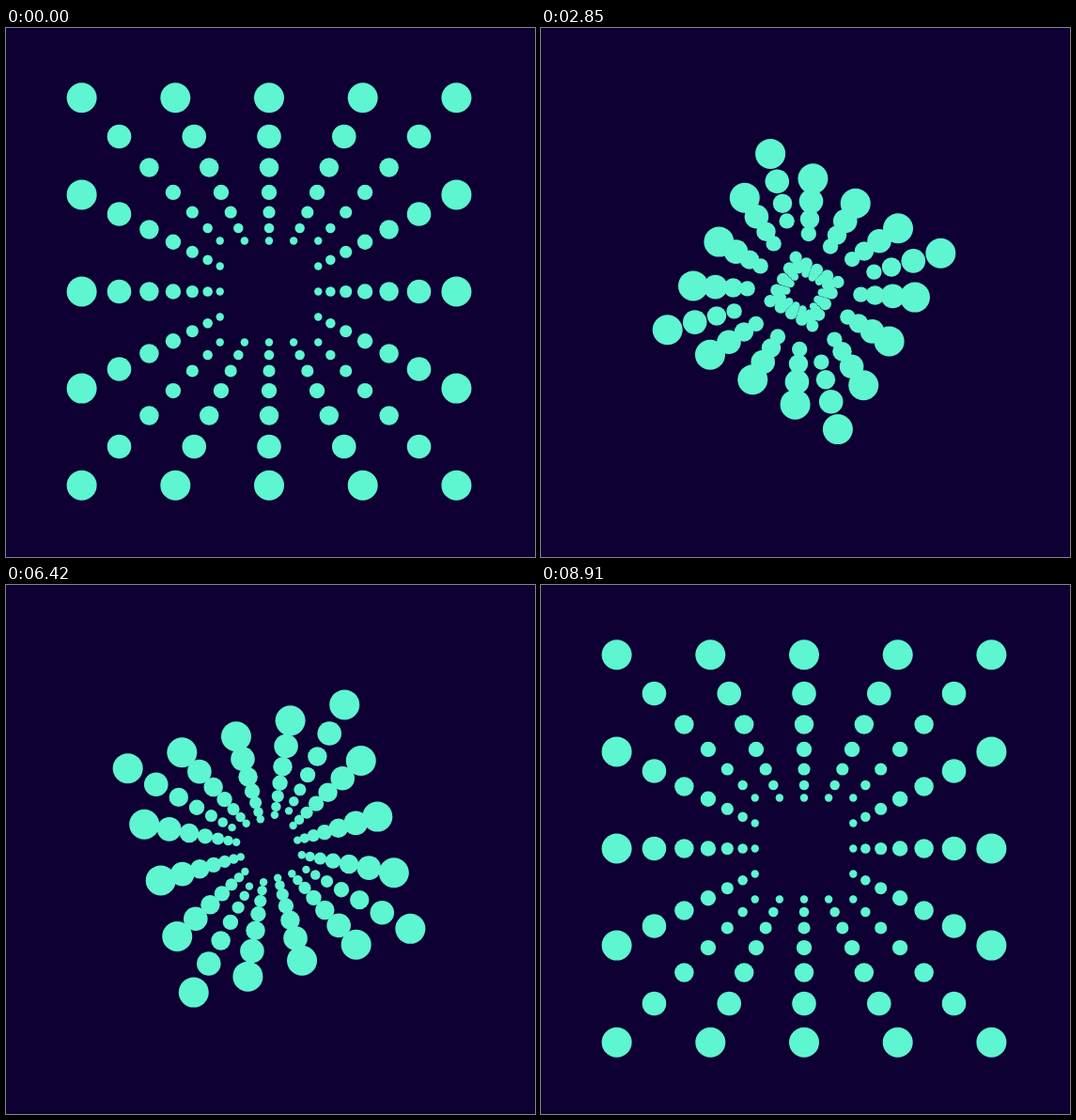
An HTML page with a canvas that plays this animation: 563x563 px, repeating every 8940 ms.

```html
<!DOCTYPE html>
<html lang="en">
<head>
<meta charset="utf-8">
<title>Dot burst</title>
<style>
  html, body { margin: 0; width: 100%; height: 100%; overflow: hidden; background: #0e0032; }
  canvas { display: block; }
</style>
</head>
<body>
<canvas id="stage" width="563" height="563"></canvas>
<script>
const ctx = document.getElementById('stage').getContext('2d');
const SIZE = 563, LOOP = 8940, STEP = 30;
const CENTER = { x: 280, y: 280.5 };
const HALF = { x: 199.4, y: 206.2 };
const DOT = 16, RINGS = 7, OUTER_RINGS = 4, SHRINK = 0.8;

// Border cells of a 5 x 5 grid, in units of -1..1
const border = [];
for (let row = -2; row <= 2; row++) {
  for (let col = -2; col <= 2; col++) {
    if (Math.abs(row) === 2 || Math.abs(col) === 2) border.push([col / 2, row / 2]);
  }
}

function ease(time, start, end) {
  const t = Math.min(1, Math.max(0, (time - start) / (end - start)));
  return t * t * (3 - 2 * t);
}

function draw(time) {
  const angle = Math.PI / 2 * (ease(time, 1840, 4435) + ease(time, 4530, 7127));
  const cos = Math.cos(angle), sin = Math.sin(angle);
  const grow = ease(time, 5487, 7127);
  const outerScale = 1 - ease(time, 1843, 3930) + grow;
  const innerScale = 1 - ease(time, 1843, 3458) + grow;

  ctx.fillStyle = '#0e0032';
  ctx.fillRect(0, 0, SIZE, SIZE);
  ctx.fillStyle = '#5ef5d1';
  for (let ring = 0; ring < RINGS; ring++) {
    const size = SHRINK ** ring;
    const spread = size * (ring < OUTER_RINGS ? outerScale : innerScale);
    for (const [u, v] of border) {
      const x = u * HALF.x * spread, y = v * HALF.y * spread;
      ctx.beginPath();
      ctx.arc(CENTER.x + x * cos - y * sin, CENTER.y + x * sin + y * cos, DOT * size, 0, Math.PI * 2);
      ctx.fill();
    }
  }
}

const began = performance.now();
function tick() {
  const time = (performance.now() - began) % LOOP;
  draw(Math.floor(time / STEP) * STEP);
  requestAnimationFrame(tick);
}
tick();
</script>
</body>
</html>
```
